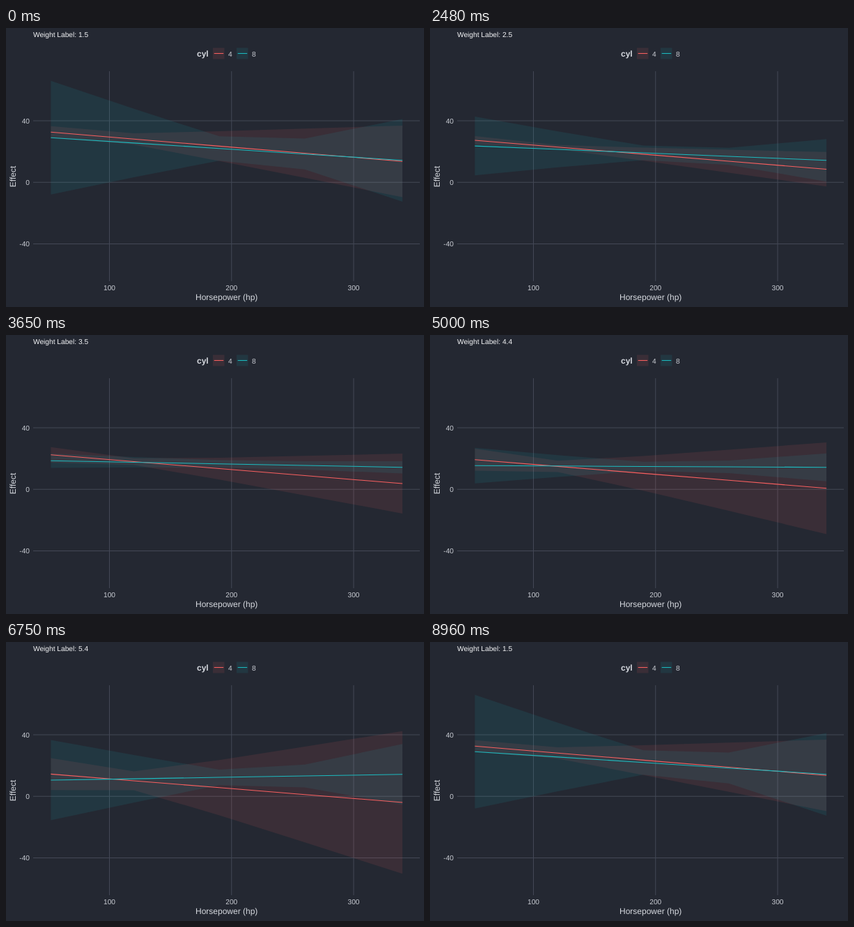
Recreate the animation shown at these times as an HTML page. Size 600 by 400 pixels, loop 9 s.

```html
<!DOCTYPE html>
<html lang="en">
<head>
<meta charset="utf-8">
<title>Effect of horsepower by weight</title>
<style>
  html, body { margin: 0; width: 100%; height: 100%; overflow: hidden; background: #242832; }
  svg { display: block; width: 600px; height: 400px; }
  text { font: 10.2px "Liberation Sans", Arial, sans-serif; fill: #c9ccd3; text-rendering: geometricPrecision; }
  .title { fill: #f2f3f5; }
  .axis { font-size: 12px; fill: #d6d9df; }
  .legend { font-size: 12px; font-weight: bold; fill: #d6d9df; }
  .grid { stroke: #434855; stroke-width: 1.07; }
  .band { fill-opacity: .1; }
  .line { stroke-width: 1.07; fill: none; }
</style>
</head>
<body>
<svg id="chart" viewBox="0 0 600 400"></svg>
<script>
const RED = '#f85f5f', TEAL = '#1cb9be';
const STEP = 45, FRAMES = 200;
const LOW = 52, MID = 190, HIGH = 340;
const weights = [1.5, 2.5, 3.5, 4.4, 5.4];
const hps = [LOW, 120, MID, 260, HIGH];

// First and last step of the move away from each weight
const moves = [[14, 40], [55, 81], [95, 119], [134, 159], [174, 199]];

const xOf = hp => 148.5 + (hp - 100) * 1.7525;
const yOf = v => 221.25 - v * 2.2065;
const mix = (a, b, p) => a + (b - a) * p;
const parabola = (k, vertex, floor) => w => k * (w - vertex) ** 2 + floor;

// left, right: line height and its slope per unit of weight
// spread: squared half-height of the band at LOW, MID and HIGH
const series = [
  { color: RED, left: [149.3, 11.27], right: [191.2, 10.9],
    spread: [parabola(65, 2.3, 30), parabola(268, 2.694, 71.6), parabola(1667, 2.618, 550)] },
  { color: TEAL, left: [157.2, 11.5], right: [189.7, 0],
    spread: [parabola(1497, 3.592, 91.5), parabola(54.6, 3.753, 27), parabola(808, 3.56, 73)] }
];

// The variance is quadratic in horsepower, so three points settle it
function halfHeight(spread, hp, w) {
  const [a, b, c] = spread.map(f => f(w));
  const variance =
    a * (hp - MID) * (hp - HIGH) / ((LOW - MID) * (LOW - HIGH)) +
    b * (hp - LOW) * (hp - HIGH) / ((MID - LOW) * (MID - HIGH)) +
    c * (hp - LOW) * (hp - MID) / ((HIGH - LOW) * (HIGH - MID));
  return Math.sqrt(Math.max(0, variance));
}

// Heights of line and band at each horsepower for one weight
const shape = (s, w) => hps.map(hp => {
  const [y1, y2] = [s.left, s.right].map(([y, slope]) => y + slope * (w - weights[0]));
  const y = mix(y1, y2, (hp - LOW) / (HIGH - LOW));
  const h = halfHeight(s.spread, hp, w);
  return { y, top: y - h, bottom: y + h };
});

const chart = document.getElementById('chart');
function add(tag, attrs, text) {
  const el = document.createElementNS('http://www.w3.org/2000/svg', tag);
  for (const key in attrs) el.setAttribute(key, attrs[key]);
  if (text) el.textContent = text;
  return chart.appendChild(el);
}
const line = (x1, y1, x2, y2, attrs) => add('line', { x1, y1, x2, y2, ...attrs });

for (const v of [40, 0, -40]) {
  line(39, yOf(v), 594, yOf(v), { class: 'grid' });
  add('text', { x: 34, y: yOf(v) + 3.7, 'text-anchor': 'end' }, String(v));
}
for (const hp of [100, 200, 300]) {
  line(xOf(hp), 62, xOf(hp), 363, { class: 'grid' });
  add('text', { x: xOf(hp), y: 376, 'text-anchor': 'middle' }, String(hp));
}
add('text', { x: 316.7, y: 390, class: 'axis', 'text-anchor': 'middle' }, 'Horsepower (hp)');
add('text', { class: 'axis', 'text-anchor': 'middle', transform: 'translate(14 213) rotate(-90)' }, 'Effect');
add('text', { x: 274, y: 41, class: 'legend' }, 'cyl');
[[297, RED, '4'], [331, TEAL, '8']].forEach(([x, color, name]) => {
  add('rect', { x, y: 28.5, width: 16.5, height: 16, fill: color, class: 'band' });
  line(x + 1.7, 36.5, x + 15.2, 36.5, { stroke: color, class: 'line' });
  add('text', { x: x + 22, y: 41 }, name);
});
const title = add('text', { x: 39, y: 13, class: 'title' });

for (const s of series) {
  s.shapes = weights.map(w => shape(s, w));
  s.band = add('polygon', { fill: s.color, class: 'band' });
}
for (const s of series) s.line = add('polyline', { stroke: s.color, class: 'line' });

function poseAt(n) {
  const from = moves.findIndex(([, end]) => n < end);
  if (from < 0) return { from: 0, to: 0, p: 0 };
  const [start, end] = moves[from];
  const p = Math.max(0, (n - start + 1) / (end - start + 1));
  return { from, to: (from + 1) % weights.length, p };
}

function draw(ms) {
  const { from, to, p } = poseAt(Math.floor((ms + 5) / STEP) % FRAMES);
  for (const s of series) {
    const edge = key => hps.map((hp, i) =>
      [xOf(hp), mix(s.shapes[from][i][key], s.shapes[to][i][key], p)]);
    s.band.setAttribute('points', [...edge('top'), ...edge('bottom').reverse()].join(' '));
    s.line.setAttribute('points', edge('y').join(' '));
  }
  title.textContent = 'Weight Label: ' + weights[p < .5 ? from : to];
}

const t0 = performance.now();
function tick(now) {
  draw(Math.max(0, now - t0));
  requestAnimationFrame(tick);
}
draw(0);
requestAnimationFrame(tick);
</script>
</body>
</html>
```
